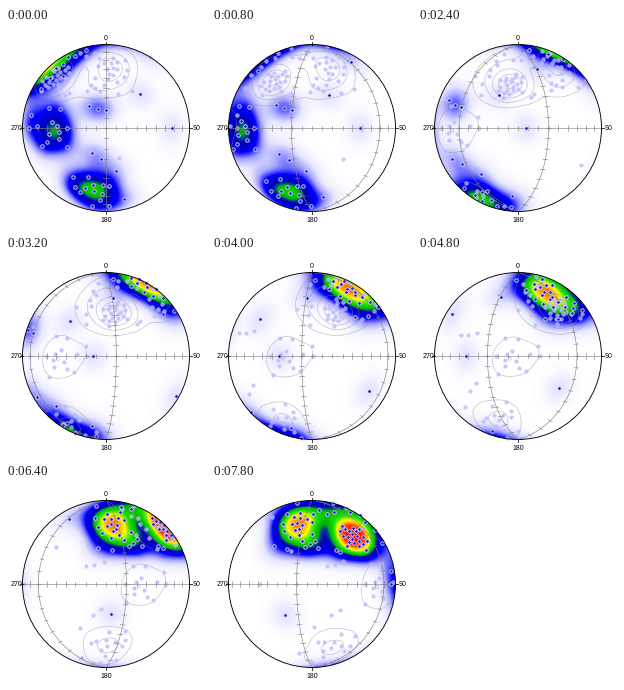
Write a matplotlib script that moves like this. It is 200 px wide and 200 px high and loops after 8000 ms.

```python
import numpy as np
import matplotlib.pyplot as plt
from matplotlib.animation import FuncAnimation
from matplotlib.colors import LinearSegmentedColormap
from matplotlib.patches import Circle

SIZE, DPI = 200, 100
PX = 72 / DPI
CX, CY, R = 100, 100, 83.5
FRAMES, STEP, INTERVAL = 40, 5, 200
KAPPA = 30
PEAK = 15.0


def unproject(x, y):
    """Equal-area disc position to a unit vector on the near hemisphere."""
    u, v = (x - CX) / R, (CY - y) / R
    r2 = u * u + v * v
    f = np.sqrt(np.maximum(2 - r2, 0))
    return np.stack([u * f, v * f, 1 - r2], axis=-1)


def project(p):
    f = R / np.sqrt(1 + p[..., 2])
    return CX + p[..., 0] * f, CY - p[..., 1] * f


def turn(p, deg):
    """Spin vectors about the vertical axis of the disc; positive goes left."""
    a = np.radians(deg)
    c, s = np.cos(a), np.sin(a)
    x, y, z = p[..., 0], p[..., 1], p[..., 2]
    return np.stack([x * c - z * s, y, x * s + z * c], axis=-1)


def lonlat(lon, lat):
    lon, lat = np.radians(lon), np.radians(lat)
    return np.stack([np.cos(lat) * np.sin(lon), np.sin(lat) + 0 * lon,
                     np.cos(lat) * np.cos(lon)], axis=-1)


def seen_at(angle, spots):
    xy = np.array(spots, float)
    return turn(unproject(xy[:, 0], xy[:, 1]), -angle)


west = [(23, 100), (31, 98), (46, 94), (43, 106), (41, 114), (51, 98),
        (53, 104), (53, 111), (61, 100), (61, 119), (36, 118), (25, 87),
        (83, 78), (92, 81), (100, 82), (86, 125), (95, 131)]
south = [(67, 149), (82, 149), (79, 160), (87, 157), (97, 157), (88, 163),
         (74, 164), (103, 158), (96, 166), (94, 172), (86, 178), (103, 178),
         (69, 159), (118, 171), (110, 143)]
rim = [(44, 50), (50, 40), (57, 36), (62, 29), (69, 28), (80, 22),
       (57, 48), (35, 61)]
north = [(75, 30), (82, 33), (88, 29), (85, 39), (90, 41), (95, 35),
         (100, 38), (83, 46), (87, 51), (90, 57), (101, 30), (103, 57),
         (98, 60), (93, 63), (72, 47), (78, 53), (100, 50), (75, 65),
         (62, 62), (71, 40), (107, 26), (115, 30), (122, 28), (106, 64),
         (80, 40), (88, 34), (87, 45)]
dense = [(133, 45), (137, 47), (140, 50), (144, 47), (145, 52), (140, 55),
         (136, 53), (147, 57), (151, 53), (142, 59), (137, 58), (151, 60),
         (131, 52), (128, 47), (155, 57), (135, 62), (147, 45), (147, 62),
         (141, 44), (154, 66), (124, 66), (128, 68), (130, 42)]

dots = np.concatenate([
    seen_at(0, west + south + rim),
    seen_at(20, [(27, 78), (37, 79), (117, 67)]),
    seen_at(60, [(108, 100), (119, 41), (111, 22)]),
    seen_at(100, [(157, 135)]),
    seen_at(195, north + dense),
])

ramp = [(0, "#ffffff"), (0.35, "#f7f7ff"), (1.0, "#e4e4ff"),
        (1.9, "#a0a0ff"), (3.1, "#0000ff"), (4.9, "#0000b4"),
        (5.6, "#006478"), (5.8, "#00b400"), (7.4, "#1ee600"),
        (8.3, "#96f000"), (8.9, "#ffff00"), (10.2, "#ffb400"),
        (11.6, "#ff3c00"), (PEAK, "#ff0000")]
cmap = LinearSegmentedColormap.from_list(
    "density", [(v / PEAK, c) for v, c in ramp], N=512)

axis = np.arange(16, 184) + 0.5
gx, gy = np.meshgrid(axis, axis)
near = unproject(gx, gy)
far = near * [1, 1, -1]
outside = np.hypot(gx - CX, gy - CY) > R + 1


def density(grid, p):
    return np.exp(KAPPA * (grid @ p.T - 1)).sum(axis=-1)


fig = plt.figure(figsize=(SIZE / DPI, SIZE / DPI), dpi=DPI, facecolor="white")
ax = fig.add_axes([0, 0, 1, 1])


def line(p, color="#808080", z=4):
    x, y = project(p)
    ax.plot(x, y, color=color, lw=0.6 * PX, zorder=z)


def draw_grid(angle):
    lat = np.linspace(-90, 90, 91)
    for base in range(0, 360, 90):
        lon = (base - angle + 180) % 360 - 180
        if abs(lon) >= 90:
            continue
        line(lonlat(np.full_like(lat, lon), lat))
        for t in range(-80, 90, 10):
            half = 2.3 / np.cos(np.radians(t))
            line(lonlat(np.array([lon - half, lon + half]), np.full(2, t)))
    line(lonlat(np.linspace(-90, 90, 3), np.zeros(3)))
    for lon in range(-85, 90, 5):
        if (lon + angle) % 10 == 0:
            line(lonlat(np.full(2, lon), np.array([-2.3, 2.3])))


def draw_dots(p, fill, edge, z, alpha=1):
    x, y = project(p)
    ax.plot(x, y, "o", ms=3.5 * PX, mfc=fill, mec=edge, mew=0.8 * PX,
            alpha=alpha, zorder=z)


def draw_frame():
    ax.add_patch(Circle((CX, CY), R, fill=False, ec="black",
                        lw=0.9 * PX, zorder=8))
    for dx, dy in ((0, -1), (1, 0), (0, 1), (-1, 0)):
        ax.plot([CX + dx * R, CX + dx * (R + 2.5)],
                [CY + dy * R, CY + dy * (R + 2.5)],
                color="black", lw=0.8 * PX, zorder=8)
    for x, y, s in ((100, 10, "0"), (191, 100, "90"),
                    (100, 191, "180"), (10, 100, "270")):
        ax.text(x, y, s, size=7 * PX, ha="center", va="center_baseline",
                family="Liberation Sans", color="black", zorder=9)


def draw(i):
    angle = STEP * i
    ax.clear()
    ax.set(xlim=(0, SIZE), ylim=(SIZE, 0))
    ax.axis("off")
    disc = Circle((CX, CY), R, transform=ax.transData)

    p = turn(dots, angle)
    img = ax.imshow(density(near, p), cmap=cmap, vmin=0, vmax=PEAK,
                    extent=(16, 184, 184, 16), aspect="auto",
                    interpolation="bilinear", zorder=1)
    img.set_clip_path(disc)

    back = np.ma.array(density(far, p), mask=outside)
    rings = ax.contour(gx, gy, back, levels=[2.9, 5.8, 8.7, 11.6, 14.5],
                       colors="#909090", linewidths=0.6 * PX,
                       alpha=0.6, zorder=2)
    rings.set_clip_path(disc)

    draw_grid(angle)
    front = p[:, 2] >= 0
    draw_dots(p[~front] * [1, 1, -1], "#b4b4ff", "#c8c8ff", 3, 0.75)
    draw_dots(p[front], "#1414c8", "#e6e6ff", 5)
    draw_frame()
    return []


anim = FuncAnimation(fig, draw, frames=FRAMES, interval=INTERVAL,
                     init_func=lambda: [], repeat=True, repeat_delay=0,
                     blit=False)
plt.show()
```
